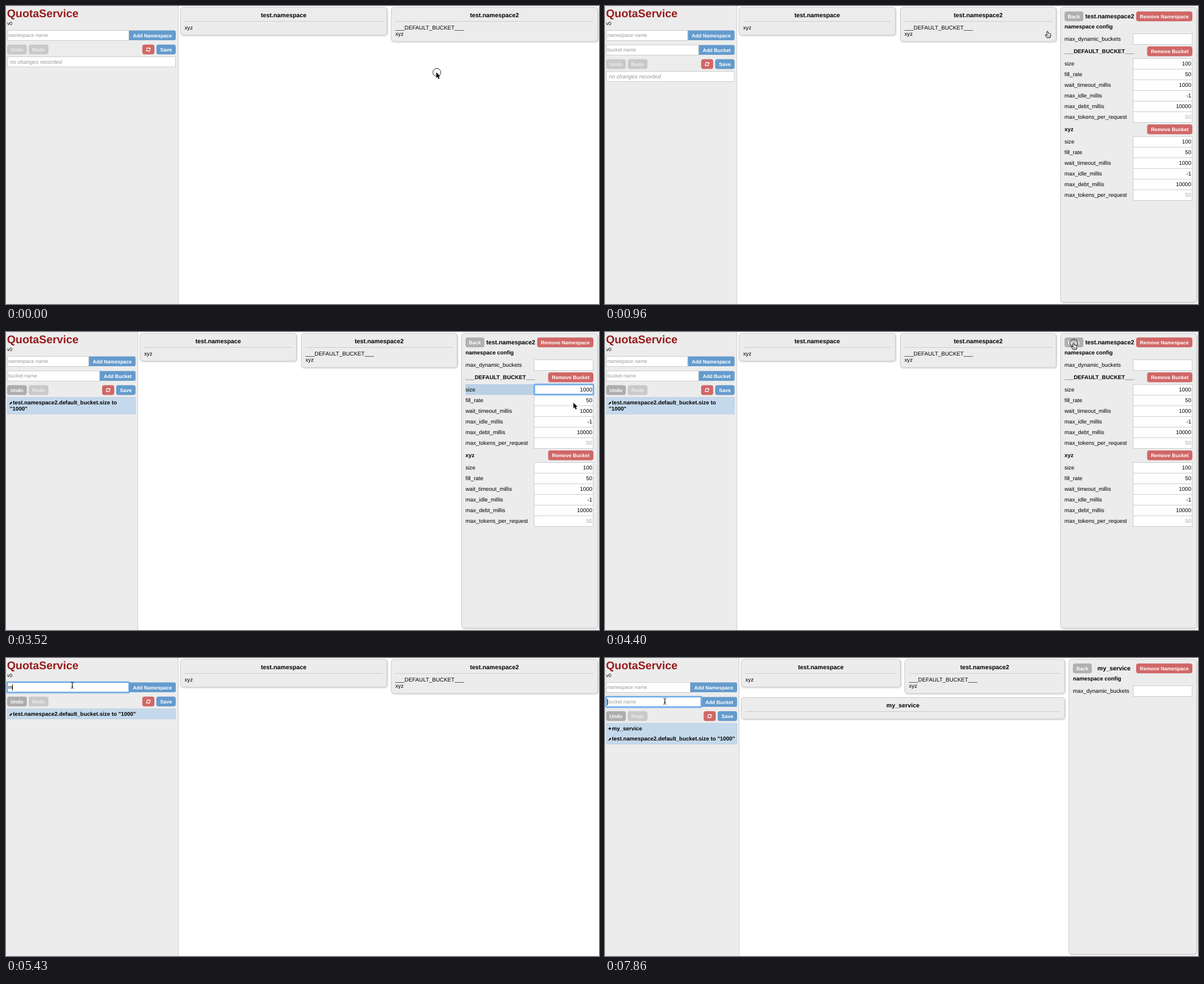
Animation of 1055 by 531 pixels, one loop 8 s. Source, as an HTML page with a canvas:

```html
<!DOCTYPE html>
<html lang="en">
<head>
<meta charset="utf-8">
<title>QuotaService</title>
<style>
html, body { margin: 0; width: 100%; height: 100%; overflow: hidden; background: #fff; }
canvas { display: block; }
</style>
</head>
<body>
<canvas id="stage" width="1055" height="531"></canvas>
<script>
const ctx = document.getElementById('stage').getContext('2d');
const LOOP = 8000;
const BASE = 9.85, TITLE = 10.8, SMALL = 8.95;
const GRAY = '#ececec', LINE = '#cccccc', BLUE = '#649bcd', RED = '#d16767', MUTED = '#b0b0b0';

// side: sidebar edge, right: edge of its controls, cards: [x, width], panel: detail panel x
const LIST = { side: 306, right: 302, cards: [[310, 368], [685, 368]] };
const DETAIL = { side: 234, right: 230.5, cards: [[238, 279], [525, 278]], panel: 810, title: 'test.namespace2' };
const ADDED = { side: 238, right: 235, cards: [[242, 284], [533, 285]], panel: 825, title: 'my_service' };

const FIELDS = [['size', '100'], ['fill_rate', '50'], ['wait_timeout_millis', '1000'],
  ['max_idle_millis', '-1'], ['max_debt_millis', '10000'], ['max_tokens_per_request', '50']];

// pointer path: time, x, y, shape kept until the next point
const PATH = [
  [0, 765.5, 118, arrow], [150, 765.5, 118, arrow], [520, 782, 62, hand], [610, 787.5, 45, hand],
  [1079, 787.5, 45, hand], [1080, 797, 50, hand], [1170, 797, 50, hand], [1300, 850, 95, arrow],
  [1480, 985, 124, beam], [1630, 1035, 104, beam], [3420, 1035, 104, beam], [3500, 1020, 122, arrow],
  [3650, 945, 150, arrow], [3850, 790, 158, arrow], [4000, 697, 118, arrow], [4100, 708, 62, hand],
  [4220, 765, 34, hand], [4350, 834, 19.5, hand], [4519, 834, 19.5, hand], [4520, 419, 24, arrow],
  [4620, 419, 24, arrow], [4850, 219, 42, beam], [5010, 118, 48.5, beam], [6790, 118, 48.5, beam],
  [6980, 219, 51, arrow], [7180, 268.5, 54, arrow], [7359, 268.5, 54, arrow], [7420, 246, 52, arrow],
  [7520, 246, 52, arrow], [7700, 171, 70, beam], [7860, 106.5, 77, beam], [LOOP, 106.5, 77, beam]
];
const CLICKS = [[0, 60], [910, 960], [2110, 2170], [4350, 4520], [4950, 5010], [7260, 7360], [7800, 7860]];
const KEY_TIMES = [5430, 5550, 5730, 5850, 6020, 6080, 6320, 6420, 6510, 6610];

const within = (t, from, to) => t >= from && t < to;

function text(str, x, y, { size = BASE, style = '', color = '#000', align = 'left' } = {}) {
  ctx.font = `${style} ${size}px "Liberation Sans", Helvetica, Arial, sans-serif`;
  ctx.fillStyle = color;
  ctx.textAlign = align;
  ctx.fillText(str, x, y);
  return ctx.measureText(str).width;
}

function rect(x, y, w, h, fill, radius = 0) {
  ctx.beginPath();
  ctx.roundRect(x, y, w, h, radius);
  ctx.fillStyle = fill;
  ctx.fill();
}

function button(label, x, y, w, color, { radius = 4, ink = '#fff' } = {}) {
  rect(x, y, w, 17.5, color, radius);
  text(label, x + w / 2, y + 12, { size: SMALL, style: 'bold', color: ink, align: 'center' });
}

function input(x, y, w, h = 18) {
  rect(x, y, w, h + 1, '#fff');
  ctx.strokeStyle = LINE;
  ctx.lineWidth = 1;
  ctx.strokeRect(x + 0.5, y + 0.5, w - 1, h);
}

function focusRing(x, y, w, h = 19) {
  ctx.save();
  ctx.shadowColor = '#6aacf0';
  ctx.shadowBlur = 2;
  ctx.strokeStyle = '#6aa8ea';
  ctx.lineWidth = 2;
  ctx.beginPath();
  ctx.roundRect(x, y, w, h, 1);
  ctx.stroke();
  ctx.restore();
}

const caret = (x, y) => rect(Math.round(x), y, 1, 11, '#000');

function surface(x, y, w, h) {
  ctx.save();
  ctx.shadowColor = 'rgba(0,0,0,.22)';
  ctx.shadowBlur = 3;
  ctx.shadowOffsetX = ctx.shadowOffsetY = 1;
  rect(x, y, w, h, GRAY, 5);
  ctx.restore();
  ctx.strokeStyle = LINE;
  ctx.lineWidth = 1;
  ctx.beginPath();
  ctx.roundRect(x + 0.5, y + 0.5, w - 1, h - 1, 5);
  ctx.stroke();
}

function card([x, w], y, title, lines) {
  surface(x, y, w, 39 + lines.length * 11.3);
  text(title, x + w / 2, y + 17.7, { size: TITLE, style: 'bold', align: 'center' });
  rect(x + 8, y + 25, w - 16, 1, LINE);
  lines.forEach((line, i) => text(line, x + 7.7, y + 40 + i * 11.3));
}

function refreshIcon(x, y) {
  ctx.strokeStyle = ctx.fillStyle = '#fff';
  ctx.lineWidth = 1.3;
  for (const turn of [0, Math.PI]) {
    ctx.save();
    ctx.translate(x, y);
    ctx.rotate(turn);
    ctx.beginPath();
    ctx.arc(0, 0, 3, Math.PI * 1.05, Math.PI * 1.8);
    ctx.stroke();
    ctx.beginPath();
    ctx.moveTo(3.9, -3.8);
    ctx.lineTo(3.9, -0.6);
    ctx.lineTo(0.8, -0.6);
    ctx.fill();
    ctx.restore();
  }
}

function strokePath(points, width, color = '#000') {
  ctx.beginPath();
  points.forEach(([x, y]) => ctx.lineTo(x, y));
  ctx.strokeStyle = color;
  ctx.lineWidth = width;
  ctx.stroke();
}

function pencil(y) {
  strokePath([[7.4, y - 1], [10.4, y - 4]], 2.2);
  rect(6.3, y - 1, 1.3, 1.3, '#000');
}

function plus(y) {
  rect(6, y - 4, 5, 1.4, '#000');
  rect(7.8, y - 5.8, 1.4, 5, '#000');
}

function changes(t, layout, y) {
  const w = layout.right - 2, bold = { style: 'bold' };
  const change = 'test.namespace2.default_bucket.size to';
  if (t < 3050) {
    input(2, y, w);
    text('no changes recorded', 7, y + 13, { style: 'italic', color: '#999' });
    return;
  }
  const height = layout === LIST ? 19 : layout === DETAIL ? 30.5 : 38;
  rect(2, y, w, height, '#c5d9ec');
  ctx.strokeStyle = '#bdd0e2';
  ctx.lineWidth = 1;
  ctx.strokeRect(2.5, y + 0.5, w - 1, height - 1);
  let base = y + 13;
  if (layout === ADDED) {
    plus(base);
    text('my_service', 12.3, base, bold);
    base += 18;
  }
  pencil(base);
  if (layout === DETAIL) {
    text(change, 12.3, base, bold);
    text('"1000"', 6.8, base + 11.3, bold);
  } else {
    text(change + ' "1000"', 12.3, base, bold);
  }
}

function nameField(t, w) {
  const typed = t < 7360 ? 'my_service'.slice(0, KEY_TIMES.filter(k => k <= t).length) : '';
  const width = text(typed || 'namespace name', 4, 55.3, { size: SMALL, color: typed ? '#000' : '#999' });
  if (!within(t, 5010, 7260)) return;
  focusRing(2, 43, w, 18.5);
  if (t < 7110) caret(typed ? 4 + width : 4, 47);
}

function sidebar(t, layout) {
  const { side, right } = layout, detail = layout !== LIST, bucketEdge = right - 63.5;
  rect(0, 0, side, 531, GRAY);
  rect(side, 0, 1, 531, LINE);
  text('QuotaService', 1.7, 20, { size: 19.75, style: 'bold', color: '#981b1b' });
  text('v0', 2, 33.7, { size: 8.7 });

  input(2, 43, right - 85);
  nameField(t, right - 85);
  button('Add Namespace', right - 83, 43.5, 83, BLUE, { radius: [0, 3, 3, 0] });

  if (detail) {
    input(2, 69, bucketEdge - 2);
    text('bucket name', 4, 81.3, { size: SMALL, color: '#999' });
    button('Add Bucket', bucketEdge, 69.5, 63.5, BLUE, { radius: [0, 3, 3, 0] });
    if (t >= 7860) {
      focusRing(2, 69, bucketEdge - 2, 18.5);
      caret(4, 73);
    }
  }

  const y = detail ? 94.7 : 68.8, off = { ink: '#ededed' };
  if (t < 3050) button('Undo', 2, y, 35, '#c9c9c9', off);
  else button('Undo', 2, y, 35, '#adadad');
  button('Redo', 40.5, y, 35, '#c9c9c9', off);
  button('', right - 59.5, y, 21.5, RED);
  refreshIcon(right - 48.8, y + 8.8);
  button('Save', right - 34.5, y, 34.5, BLUE);
  changes(t, layout, detail ? 116 : 90);
}

function fieldRow(x, y, label, value, { focused = false, color = '#000' } = {}) {
  if (focused) rect(x, y, 939 - x, 19, '#b9d0e5');
  text(label, x, y + 13);
  input(939, y, 106, 19);
  text(value, 1043, y + 13, { align: 'right', color });
}

function detailPanel(t, { panel, title }) {
  const x = panel + 7.5;
  surface(panel, 2, 1053 - panel, 526);
  button('Back', x, 9.8, 33.5, MUTED);
  text(title, (x + 33.5 + 945) / 2, 22.3, { size: TITLE, style: 'bold', align: 'center' });
  button('Remove Namespace', 945, 9.8, 100, RED);
  text('namespace config', x, 40, { style: 'bold' });
  fieldRow(x, 49, 'max_dynamic_buckets', '');
  if (title === 'my_service') return;

  const focused = within(t, 2110, 4350);
  ['___DEFAULT_BUCKET___', 'xyz'].forEach((bucket, b) => {
    const top = 72 + b * 139;
    text(bucket, x, top + 12, { style: 'bold' });
    button('Remove Bucket', 964.5, top, 80.5, RED);
    FIELDS.forEach(([label, value], i) => {
      const edited = b === 0 && i === 0;
      fieldRow(x, top + 21 + i * 19, label, edited && t >= 3050 ? '1000' : value,
        { focused: edited && focused, color: i === 5 ? '#aaa' : '#000' });
    });
  });
  if (focused) {
    focusRing(940, 93.5, 105, 18);
    if (Math.floor((t - 2110) / 470) % 2 === 0) caret(1037, 97);
  }
}

function outlined(points) {
  ctx.lineJoin = 'round';
  ctx.beginPath();
  points.forEach(([x, y]) => ctx.lineTo(x, y));
  ctx.closePath();
}

function arrow() {
  outlined([[0, 0], [0, 10.3], [2.3, 8.2], [4, 12], [5.8, 11.2], [4.2, 7.5], [7.2, 7.4]]);
  ctx.strokeStyle = '#fff';
  ctx.lineWidth = 1.6;
  ctx.stroke();
  ctx.fillStyle = '#000';
  ctx.fill();
}

function hand() {
  outlined([[-1.4, 0.6], [-0.3, -0.2], [0.8, 0.8], [1, 3.8], [2.8, 3.7], [3.4, 4.4], [4.6, 4.3], [5.4, 5.6],
    [5.4, 8], [4.4, 11.6], [-1.3, 11.6], [-4.2, 7.4], [-4, 6.2], [-2.8, 6.3], [-1.2, 7.8]]);
  ctx.fillStyle = '#fff';
  ctx.fill();
  ctx.strokeStyle = '#000';
  ctx.lineWidth = 1;
  ctx.stroke();
  for (const x of [0, 1.7, 3.4]) strokePath([[x, 7.5], [x, 10]], 0.6);
}

function beam() {
  strokePath([[0, -4.5], [0, 4.5]], 1.1);
  strokePath([[-2.7, -5.3], [-1, -5.1], [0, -4.3], [1, -5.1], [2.7, -5.3]], 0.9);
  strokePath([[-2.7, 5.3], [-1, 5.1], [0, 4.3], [1, 5.1], [2.7, 5.3]], 0.9);
  strokePath([[-1.4, 2], [1.4, 2]], 0.9);
}

function pointer(t) {
  const next = PATH.findIndex(p => p[0] > t);
  const [t0, x0, y0, shape] = PATH[next - 1], [t1, x1, y1] = PATH[next];
  const k = (t - t0) / (t1 - t0);
  ctx.save();
  ctx.translate(x0 + (x1 - x0) * k, y0 + (y1 - y0) * k);
  if (CLICKS.some(([from, to]) => within(t, from, to))) {
    ctx.beginPath();
    ctx.arc(shape === arrow ? 1 : 0, 0.3, 7, 0, Math.PI * 2);
    ctx.strokeStyle = '#222';
    ctx.lineWidth = 1;
    ctx.stroke();
  }
  shape();
  ctx.restore();
}

function draw(t) {
  const layout = t < 960 ? LIST : t < 4520 ? DETAIL : t < 7360 ? LIST : ADDED;
  ctx.textRendering = 'geometricPrecision';
  rect(0, 0, 1055, 531, '#fff');
  sidebar(t, layout);
  card(layout.cards[0], 2, 'test.namespace', ['xyz']);
  card(layout.cards[1], 2, 'test.namespace2', ['___DEFAULT_BUCKET___', 'xyz']);
  if (layout === ADDED) card([242, 576], 70, 'my_service', []);
  if (layout.panel) detailPanel(t, layout);
  pointer(t);
}

const start = performance.now();
function tick() {
  draw((performance.now() - start) % LOOP);
  requestAnimationFrame(tick);
}
tick();
</script>
</body>
</html>
```
